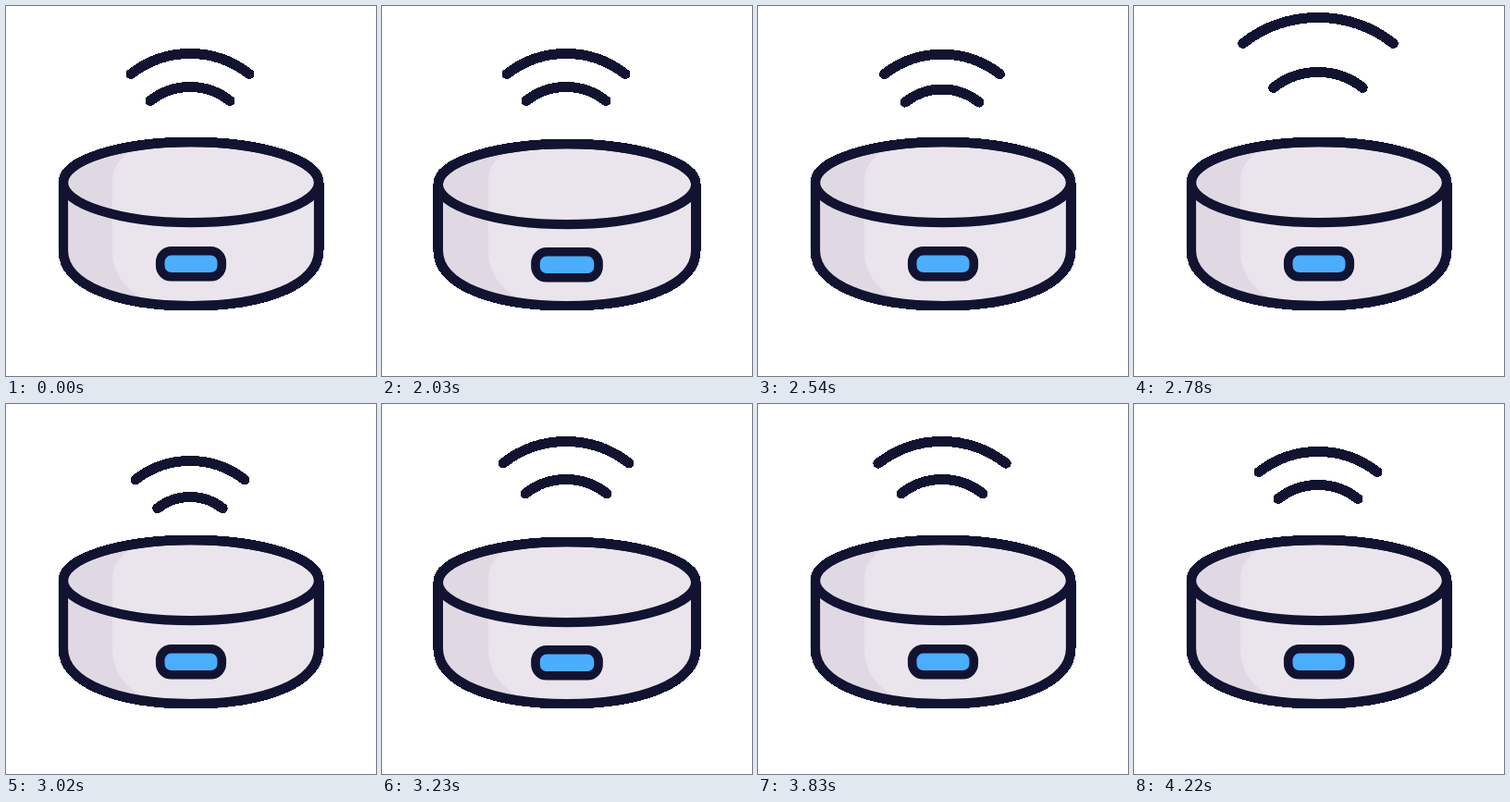
Recreate the animation shown at these times as an HTML page. Size 400 by 400 pixels, loop 4250 ms.

```html
<!DOCTYPE html>
<html lang="en">
<head>
<meta charset="utf-8">
<title>Smart speaker</title>
<style>
  html, body { margin: 0; width: 100%; height: 100%; overflow: hidden; background: #fff; }
  svg { display: block; width: 100vw; height: 100vh; }
  .ink { fill: none; stroke: #121331; stroke-width: 10.2; stroke-linecap: round; stroke-linejoin: round; }
  .hard { stroke-width: 11; shape-rendering: crispEdges; }
</style>
</head>
<body>
<svg viewBox="0 0 400 400">
  <defs>
    <path id="shell"/>
    <clipPath id="inside"><use href="#shell"/></clipPath>
  </defs>
  <path id="outer" class="ink hard"/>
  <path id="inner" class="ink hard"/>
  <use href="#shell" class="ink hard"/>
  <use href="#shell" fill="#e0d9e4"/>
  <path clip-path="url(#inside)" fill="#eae5ec"
    d="M152 148C128 158 115 171 115 190V264C115 290 130 310 160 322L200 330H350V140Z"/>
  <use href="#shell" class="ink"/>
  <ellipse id="rim" class="ink" cx="200" ry="43.5"/>
  <rect id="button" class="ink" height="28" rx="12" style="fill:#4aaefc;stroke-width:9.600"/>
</svg>
<script>
const LOOP = 4250, START = 2000, STEP = 30, BEAT = 600, BEATS = 3, SQUASH = 180;
const SWING = [180, 225, 270, 330, 420];
const TAIL = [630, 690, 820, 930, 1020];

// A track is one swing per beat, a value where beats join, and a settling tail.
function track(swing, join, tail) {
  const pts = [[0, 0]];
  for (let b = 0; b < BEATS; b++) {
    pts.push([b * BEAT + 30, b ? join : 0]);
    SWING.forEach((t, i) => pts.push([b * BEAT + t, swing[i]]));
  }
  TAIL.forEach((t, i) => pts.push([(BEATS - 1) * BEAT + t, tail[i]]));
  return pts;
}

function slope(pts, i) {
  const a = pts[i - 1], b = pts[i + 1];
  return a && b ? (b[1] - a[1]) / (b[0] - a[0]) : 0;
}

function sample(pts, t) {
  const i = pts.findIndex(p => p[0] > t) - 1;
  if (i < 0) return 0;
  const [t0, v0] = pts[i], [t1, v1] = pts[i + 1];
  const d = t1 - t0, u = (t - t0) / d, w = 1 - u;
  return v0 * w * w * (1 + 2 * u) + v1 * u * u * (3 - 2 * u)
    + d * u * w * (w * slope(pts, i) - u * slope(pts, i + 1));
}

const waves = [
  { id: 'outer', top: 51.5, half: 64, rise: 22, radius: 104,
    lift: track([39, 45, 38, 3, -10], 11, [11, 12, 2, 0, 0]),
    grow: track([.27, .33, .31, .06, -.08], .06, [.08, .13, .02, 0, 0]) },
  { id: 'inner', top: 87.5, half: 43, rise: 15, radius: 69,
    lift: track([16, 17, 13, -11, -13], 6, [6, 5, 0, -1, 0]),
    grow: track([.12, .15, .14, -.16, -.18], .02, [.02, .03, 0, -.01, 0]) }
];

function set(id, attrs) {
  const el = document.getElementById(id);
  for (const name in attrs) el.setAttribute(name, attrs[name]);
}

function drawWave(w, t) {
  const k = 1 + sample(w.grow, t), x = w.half * k, r = w.radius * k;
  const y = w.top - sample(w.lift, t) + w.rise * k;
  set(w.id, { d: `M${199 - x} ${y}A${r} ${r} 0 0 1 ${199 + x} ${y}` });
}

// While squashed the rim sinks and widens over a resting base.
function drawDevice(t) {
  const p = t % BEAT;
  const b = t < BEAT * BEATS && p < SQUASH ? Math.sin(Math.PI * p / SQUASH) ** 2 : 0;
  const rx = 138 + 4.5 * b, y = 190.7 + 8 * b, half = 33.3 + 3 * b;
  const l = 200 - rx, r = 200 + rx, bend = rx * .57;
  set('shell', { d: `M${l} ${y}A${rx} 43.5 0 0 1 ${r} ${y}V264`
    + `C${r} 302 ${200 + bend} 324 200 324S${l} 302 ${l} 264Z` });
  set('rim', { cy: y, rx });
  set('button', { x: 200 - half, y: 264.8 + 4 * b, width: 2 * half });
}

function frame() {
  const t = Math.floor(Math.max(0, performance.now() % LOOP - START) / STEP) * STEP;
  waves.forEach(w => drawWave(w, t));
  drawDevice(t);
  requestAnimationFrame(frame);
}
frame();
</script>
</body>
</html>
```
